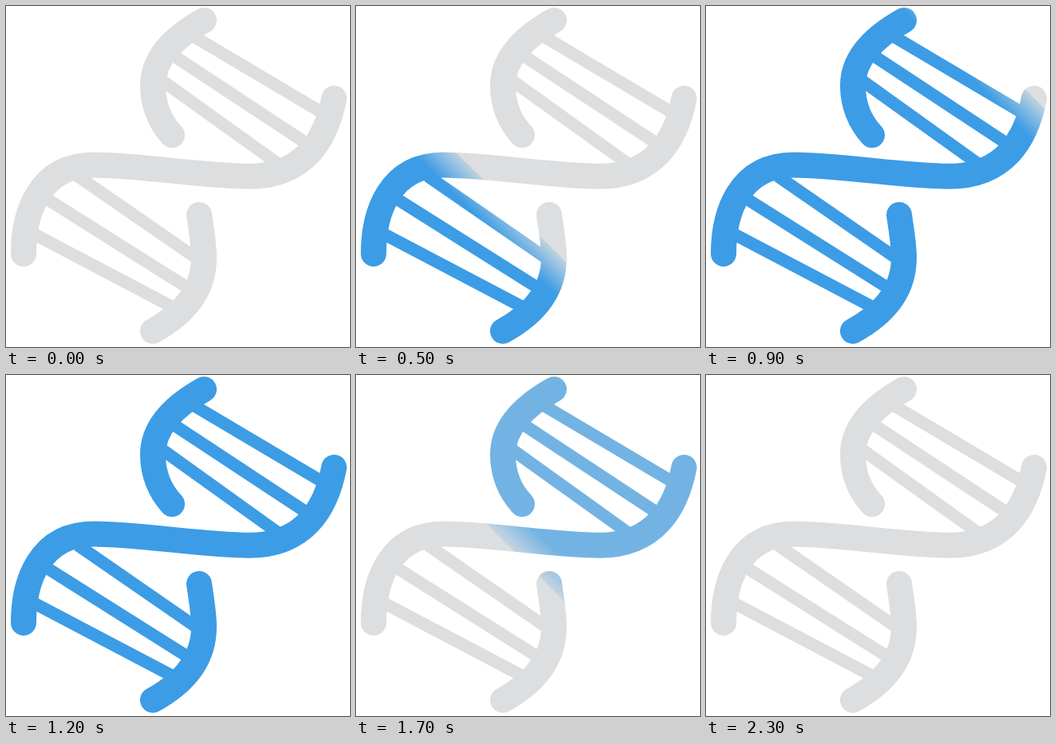
An HTML page with a canvas that plays this animation: 431x428 px, repeating every 2.4 s.

```html
<!DOCTYPE html>
<html lang="en">
<head>
<meta charset="utf-8">
<title>DNA</title>
<style>
  html, body { margin: 0; width: 100%; height: 100%; overflow: hidden; background: #fff; }
  canvas { display: block; }
</style>
</head>
<body>
<canvas id="stage" width="431" height="428"></canvas>
<script>
const ctx = document.getElementById('stage').getContext('2d');
const LOOP = 2400, STEP = 100;
const GRAY = [220, 222, 223], BLUE = [60, 156, 229];
const REACH = 500; // half length of the diagonal ramp, measured in x - y
const SOFT = 54;   // width of the soft edge
const EDGE = 0.2;  // blue left at the hard side of the soft edge

const strands = new Path2D(
  'M248 18C205 42 184 70 184 100C184 124 193 146 208 162' +
  'M22 311C22 259 42 199.5 110 199.5C165 199.5 250 213.8 305 213.8C373 213.8 401 168 411 116' +
  'M242 262C246 290 248 300 248 316C248 356 224 386 184 408');
const rungs = new Path2D(
  'M230 35.1L400 136.1M200 55.8L385 178M190 89.6L345 201' +
  'M90 213.7L245 321M45 238.2L235 358.3M30 283.7L215 381.2');

const clamp = v => Math.min(1, Math.max(0, v));

// Gray at 0, blue at 1
const tint = k => `rgb(${GRAY.map((g, i) => Math.round(g + (BLUE[i] - g) * k))})`;

// Each stop is [x - y, amount of blue]
function ramp(stops) {
  const h = REACH / 2;
  const g = ctx.createLinearGradient(-h, h, h, -h);
  for (const [d, k] of stops) g.addColorStop(clamp((d + REACH) / (2 * REACH)), tint(k));
  return g;
}

function paint(t) {
  if (t < 200 || t >= 2100) return tint(0);
  if (t < 1000) {
    const e = -59 + (t - 500) * 0.885;
    return ramp([[e - SOFT, 1], [e, EDGE], [e, 0]]);
  }
  if (t < 1400) return tint(1);
  const e = -210 + (t - 1500) * 0.93;
  const fade = clamp(1 - (t - 1500) * 0.00172);
  return ramp([[e, 0], [e, EDGE * fade], [e + SOFT, fade]]);
}

function draw(t) {
  ctx.fillStyle = '#fff';
  ctx.fillRect(0, 0, 431, 428);
  ctx.strokeStyle = paint(t);
  ctx.lineCap = 'butt';
  ctx.lineWidth = 15.5;
  ctx.stroke(rungs);
  ctx.lineCap = 'round';
  ctx.lineWidth = 32;
  ctx.stroke(strands);
}

const start = performance.now();
function tick() {
  const t = (performance.now() - start) % LOOP;
  draw(Math.floor(t / STEP) * STEP);
  requestAnimationFrame(tick);
}
tick();
</script>
</body>
</html>
```
